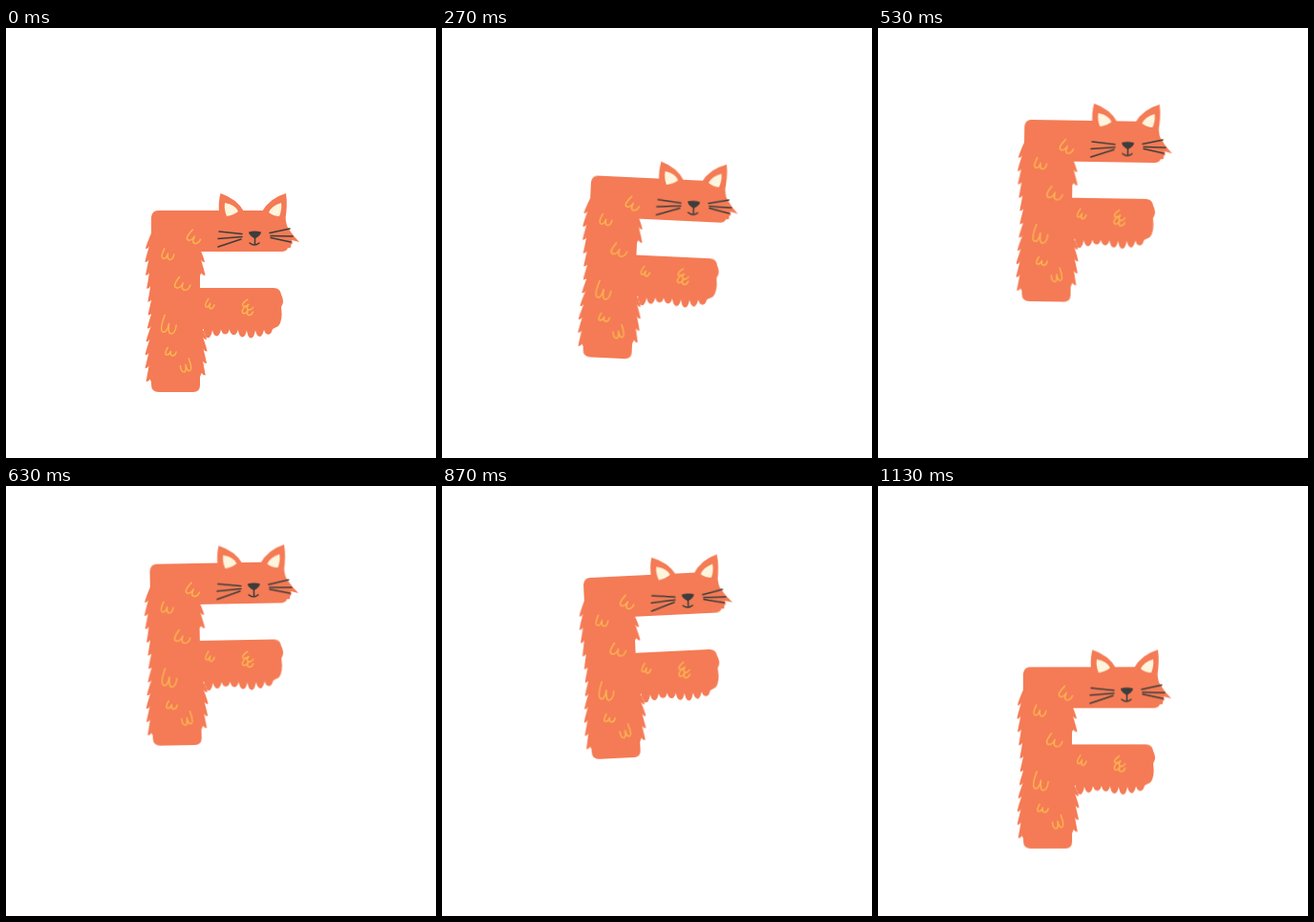
An HTML page for the animation above (1.16 s loop, 450x450 px).

```html
<!DOCTYPE html>
<html lang="en">
<head>
<meta charset="utf-8">
<title>Jumping fox letter F</title>
<style>
  html, body { margin: 0; width: 100%; height: 100%; overflow: hidden; background: #fff; }
  svg { display: block; width: 100vw; height: 100vh; }
  .jump, .tilt { animation: 1160ms cubic-bezier(.364, 0, .636, 1) infinite; }
  .jump { animation-name: jump; }
  .tilt { animation-name: tilt; transform-origin: 225px 280px; }
  @keyframes jump {
    0%, 100% { transform: translateY(0); }
    65.7% { transform: translateY(-119px); }
  }
  @keyframes tilt {
    0%, 100% { transform: rotate(0deg); }
    29.3% { transform: rotate(3deg); }
    70.3% { transform: rotate(-3deg); }
  }
  .coat { fill: #f47b55; }
  .ear { fill: #fff5dc; }
  .curls { fill: none; stroke: #fbb450; stroke-width: 1.5; stroke-linecap: round; stroke-linejoin: round; }
  #curl { vector-effect: non-scaling-stroke; }
  .lines { fill: none; stroke: #3d3d3d; stroke-width: 1.5; stroke-linecap: round; }
  .nose { fill: #3d3d3d; }
</style>
</head>
<body>
<svg viewBox="0 0 450 450">
  <defs>
    <path id="curl" d="M-4 -7 Q-9 3 -6 4.500 Q-2 6 0 -1 Q-1 6 2 6 Q6 6 7 0"/>
  </defs>
  <g class="jump"><g class="tilt">
    <g class="coat">
      <!-- stem, head and lower arm -->
      <path d="M159 191 H291 L293.500 205 V228 L289 234 H203 V272 H280 Q287 272 288 279 Q292 286 288 292
        Q290 306 285 312 L279 315 H203 V374 Q203 381 196 381 H160 Q152 381 152 373 V198 Q153 191 159 191Z"/>
      <!-- cheek tuft -->
      <path d="M292 203 Q297 214 307 224 Q303 223 299 222 Q301 226 298 227 Q299 231 295 230 Q294 234 288 234Z"/>
      <!-- ears -->
      <path d="M223 194 Q222 182 224.500 173 Q242 179 249 192Z M268 192 Q276 178 293 173 Q295 186 292 202Z"/>
      <path id="fur"/>
    </g>
    <path class="ear" d="M229 183 Q240 185 243 192 Q238 196 231 197 Q228 190 229 183Z
      M288 183 Q278 186 275 193 Q280 197 286 197 Q289 190 288 183Z"/>
    <g class="curls">
      <use href="#curl" transform="translate(197 219) rotate(18)"/>
      <use href="#curl" transform="translate(169.500 237) scale(.9)"/>
      <use href="#curl" transform="translate(185 268) rotate(8) scale(1.15 1)"/>
      <use href="#curl" transform="translate(170.500 311) scale(1.1 1.5)"/>
      <use href="#curl" transform="translate(172.500 339) scale(.8 .65)"/>
      <use href="#curl" transform="translate(188 353.500) scale(-.8 1.1)"/>
      <use href="#curl" transform="translate(213.500 289) rotate(10) scale(.65 .75)"/>
      <use href="#curl" transform="translate(253.500 290) rotate(25) scale(.8 .7)"/>
      <use href="#curl" transform="translate(253 296) rotate(10) scale(.8 .7)"/>
    </g>
    <path class="nose" d="M254 213.500 Q260 211.500 267 213.500 Q267 217 260.500 220.500 Q254 217 254 213.500Z"/>
    <path class="lines" d="M260.500 220 V226 M255 225 Q260 229 265 225
      M223 213 L247 215.500 M222 220.500 L247 218.500 M222 229 L246 221
      M276 214.500 L297 210 M277 217.500 L300 218 M277 219.500 L298 224"/>
  </g></g>
</svg>
<script>
  const repeat = (n, draw) => Array.from({ length: n }, (_, i) => draw(i)).join(' ');

  // Locks down one side of the stem: each bulges to its tip, then tucks back in.
  function locks(x, y, gap, n, side) {
    const root = x - side * 7;
    const hair = repeat(n, i => {
      const tipX = x - side * 1.6 * Math.cos((i - 1) * 0.84 + Math.PI);
      const tipY = y + i * gap;
      return `Q${tipX - side} ${tipY - 5} ${tipX} ${tipY} Q${tipX - side * 3} ${tipY} ${tipX - side * 4} ${tipY - 2.5}`;
    });
    return `M${root} ${y - gap * 1.5} ${hair} L${root} ${y + n * gap - gap * 0.7}Z`;
  }

  // Round drops hanging under the lower arm.
  const drop = i => {
    const x = 212 + i * 9;
    const y = 322.5 + 2 * Math.sin(i * 1.2 + 2);
    return `M${x - 5.5} 313 Q${x - 4.5} ${y} ${x - 0.5} ${y} Q${x + 3} ${y} ${x + 4.5} 313Z`;
  };

  document.getElementById('fur').setAttribute('d', [
    locks(147, 231, 13.9, 11, -1),
    locks(207, 245, 14, 2, 1),
    locks(209, 326, 12.5, 4, 1),
    repeat(8, drop)
  ].join(' '));
</script>
</body>
</html>
```
